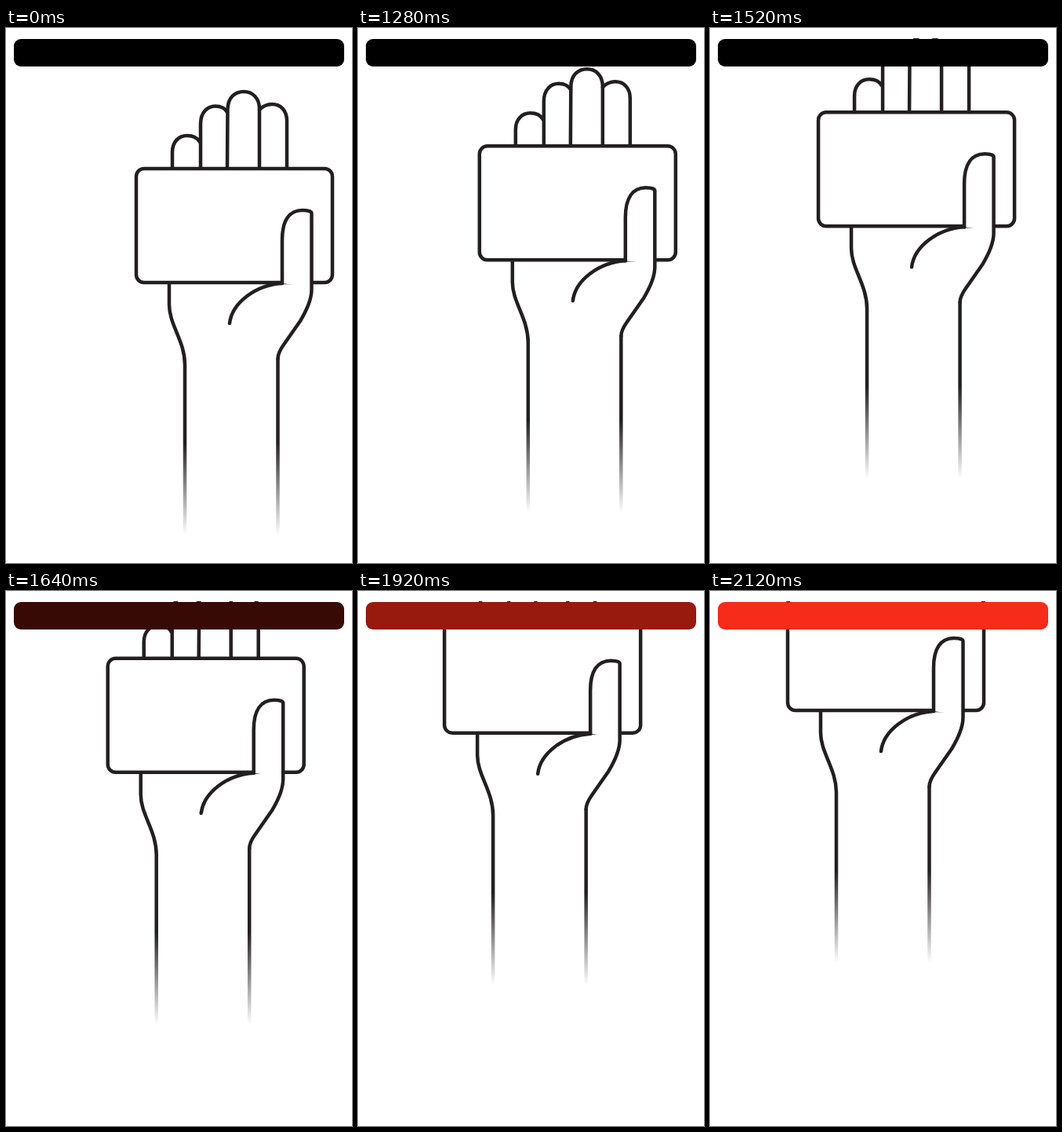
Recreate the animation shown at these times as an HTML page. Size 441 by 681 pixels, loop 5040 ms.

```html
<!DOCTYPE html>
<html lang="en">
<head>
<meta charset="utf-8">
<title>Card reader</title>
<style>
  html, body { margin: 0; width: 100%; height: 100%; overflow: hidden; background: #fff; }
  svg { display: block; width: 100%; height: 100%; }
</style>
</head>
<body>
<svg viewBox="0 0 441 681">
  <defs>
    <linearGradient id="fade" gradientUnits="userSpaceOnUse" x1="0" y1="528" x2="0" y2="645">
      <stop offset="0" stop-color="#231f20"/>
      <stop offset="1" stop-color="#231f20" stop-opacity="0"/>
    </linearGradient>
    <clipPath id="belowEdge"><rect y="13" width="441" height="668"/></clipPath>
  </defs>
  <g clip-path="url(#belowEdge)">
    <g id="hand" fill="none" stroke="#231f20" stroke-width="4.5" stroke-linecap="round" stroke-linejoin="round">
      <!-- fingers -->
      <path d="M212 178V158C212 145 220 137 231 137C238 137 244 140 247 145"/>
      <path d="M248 178V122C248 107 257 99.5 267 99.5C273 99.5 279 102 282 107"/>
      <path d="M282 178L282.5 103C283 88 292 81 303 81C314 81 323 89 323 103V178"/>
      <path d="M323 104C328 99 333 97 339 97C350 97 358 105 358 118V178"/>
      <!-- card -->
      <rect x="166" y="179" width="250" height="145" rx="10" fill="#fff"/>
      <!-- thumb and palm -->
      <path d="M352 325V270C352 245 361 232 378 232Q389.5 232 389.5 236V330" fill="#fff" stroke="none"/>
      <path d="M352 325V270C352 245 361 232 378 232Q389.5 232 389.5 236V333C389.5 345 384 358 375 373L354 403C349 410 346.5 415 346.5 421"/>
      <path d="M352 325C318 327 288 350 285 376"/>
      <!-- forearm -->
      <g stroke="url(#fade)" stroke-linecap="butt">
        <path d="M208 324V352C208 378 228 398 228 429V645"/>
        <path d="M346.5 420V645"/>
      </g>
    </g>
  </g>
  <rect id="slot" x="10" y="14" width="421" height="35" rx="9"/>
</svg>
<script>
  const LOOP = 5040, STEP = 40;
  const hand = document.getElementById('hand');
  const slot = document.getElementById('slot');
  const glowKeys = [[1520, 0], [1760, 0.45], [1920, 0.615], [2120, 1]];

  const progress = (t, from, to) => Math.min(1, Math.max(0, (t - from) / (to - from)));

  function glowAt(t) {
    let glow = 0;
    for (let i = 1; i < glowKeys.length; i++) {
      const [t0, a] = glowKeys[i - 1], [t1, b] = glowKeys[i];
      glow += (b - a) * progress(t, t0, t1);
    }
    return glow;
  }

  function draw(now) {
    const t = Math.floor(now % LOOP / STEP) * STEP;
    const slide = progress(t, 1120, 2080);
    hand.setAttribute('transform', `translate(${-67 * slide} ${-172 * slide})`);
    const glow = glowAt(t);
    slot.setAttribute('fill', `rgb(${[247, 43, 25].map(c => Math.round(c * glow))})`);
  }

  const start = performance.now();
  function tick() {
    draw(performance.now() - start);
    requestAnimationFrame(tick);
  }
  tick();
</script>
</body>
</html>
```
